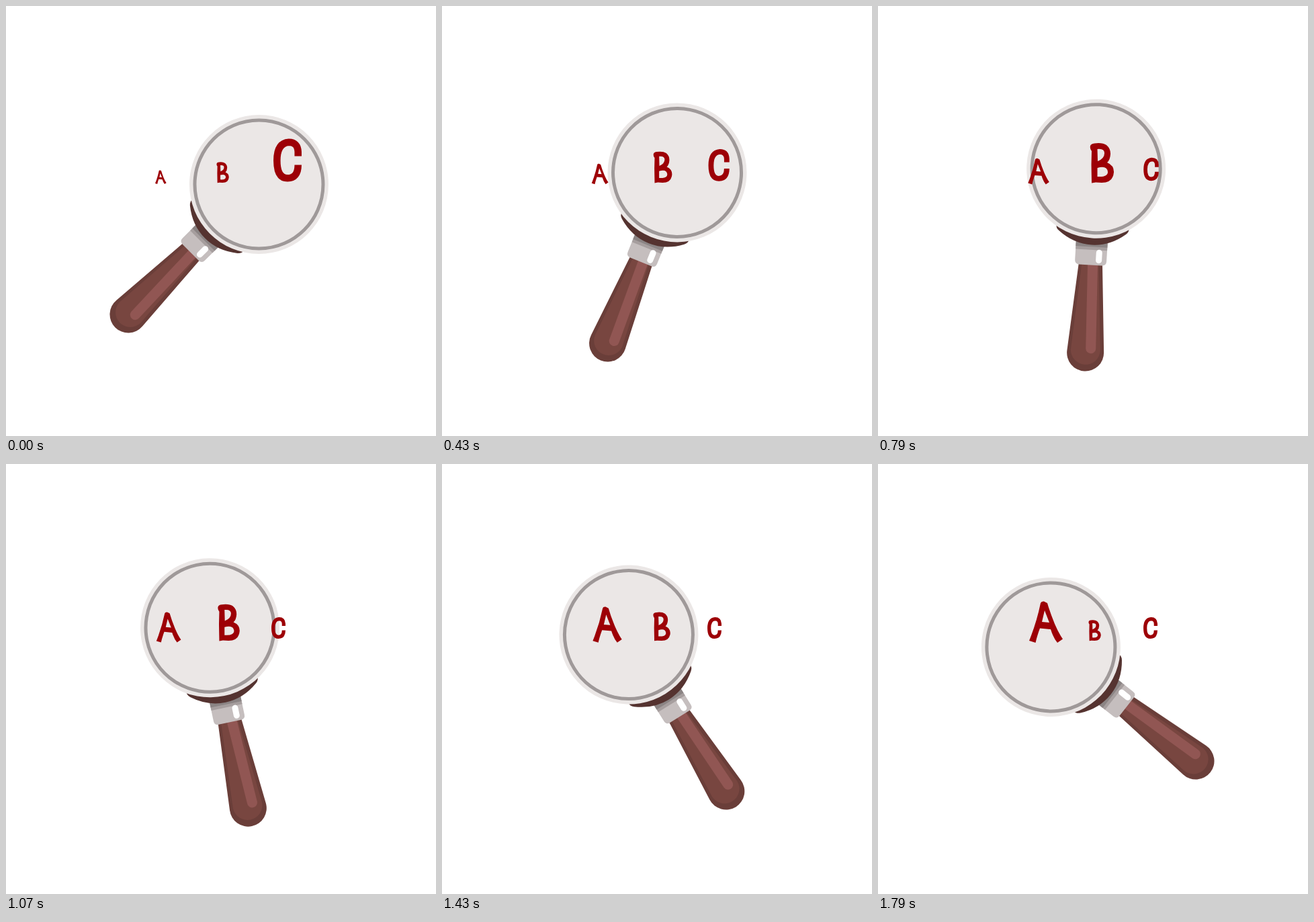
An HTML page for the animation above (2430 ms loop, 640 by 640 pixels).

```html
<!DOCTYPE html>
<html lang="en">
<head>
<meta charset="utf-8">
<title>Magnifying glass</title>
<style>
  html, body { margin: 0; width: 100%; height: 100%; overflow: hidden; background: #fff; }
  svg { display: block; width: 100%; height: 100%; }
</style>
</head>
<body>
<svg viewBox="0 0 640 640" role="img" aria-label="A B C under a magnifying glass">
  <!-- the lens centre is the origin, the handle hangs down -->
  <g id="glass">
    <path fill="#6a3e39" d="M-17.5 140L-27.4 272A27.5 27.5 0 1 0 27.4 272L17.5 140Z"/>
    <path fill="#784640" d="M-13 140L-22 270A22 22 0 0 0 22 270L12 140Z"/>
    <path fill="#915653" d="M-4.4 140L.2 268A7.5 7.5 0 0 0 15.2 267L10.6 140Z"/>
    <path fill="#c5bebe" d="M-23.5 106H23.5V137Q23.5 143.500 17 143.500H-17Q-23.500 143.500 -23.500 137Z"/>
    <path fill="#a69e9e" d="M-23.500 106H23.500V121H-23.500Z"/>
    <path fill="#8b8484" d="M-23.500 106H23.500V116.500H-23.500Z"/>
    <rect x="7.400" y="120" width="9" height="20.500" rx="4.500" fill="#fff"/>
    <path fill="#553330" d="M-54 85Q-55 91 -50 95Q-27 113.500 0 113.500Q27 113.500 50 95Q55 91 54 85Z"/>
    <circle r="103.500" fill="#ebe7e6"/>
    <circle r="95.500" fill="none" stroke="#9f9999" stroke-width="5"/>
  </g>
  <g fill="#9d0006" fill-rule="evenodd">
    <path id="a" d="M225 263Q236 236 242 207Q243 204 247 204.500L252 207Q256 221 263 238Q269 252 275 260.500L267 266Q261 259 257 246L241 244.500Q237 255 234.500 266ZM244 235L255 236L248 218Z"/>
    <path id="b" d="M318 263.500L317.500 236L318 216Q315 213 316 208Q317 205 322 204.500Q334 203 340 207Q346 212 346 220Q345.500 229 341 233Q351 237 351 247Q350 263 333 263L324 262.500ZM326.500 213Q337 212 337 219Q337 227 327 231ZM326.500 241Q341 237 342 247Q342 255 326.500 254Z"/>
    <path id="c" fill="none" stroke="#9d0006" stroke-width="10.500" d="M434.700 223.500V217Q434 202.700 421 202.700Q403.300 204 403.300 230Q403.300 256.300 419 256.300Q434.700 256 434.700 236.500"/>
  </g>
</svg>
<script>
  const LOOP = 2430, LAST = 45, MIDDLE = 21.6;
  const part = id => document.getElementById(id);
  const mix = (from, to, p) => from + (to - from) * p;

  // linear through three values: start, middle and end of the swing
  const through = (k, start, middle, end) => k < MIDDLE
    ? mix(start, middle, k / MIDDLE)
    : mix(middle, end, (k - MIDDLE) / (LAST - MIDDLE));

  // scale a letter about its own anchor
  function size(id, x, y, scale) {
    part(id).setAttribute("transform",
      `translate(${x} ${y}) scale(${scale}) translate(${-x} ${-y})`);
  }

  // 25 steps a second, shown 14 times a second
  function stepAt(time) {
    const shown = Math.floor((Math.floor(time / 10) * 10 + 5) * 0.014);
    return Math.min(LAST, Math.ceil(shown * 25 / 14));
  }

  function draw() {
    const k = stepAt(performance.now() % LOOP);
    const angle = through(k, 45.15, 0, -51.8);
    part("glass").setAttribute("transform",
      `translate(320 321.7) rotate(${angle}) translate(0 -79.65)`);
    size("a", 220.5, 264.5, mix(1 / 3, 1, k / LAST));
    size("b", 311, 263, through(k, 0.52, 1.04, 0.52));
    size("c", 392, 258.5, through(k, 1, 0.5, 0.5));
    requestAnimationFrame(draw);
  }
  draw();
</script>
</body>
</html>
```
